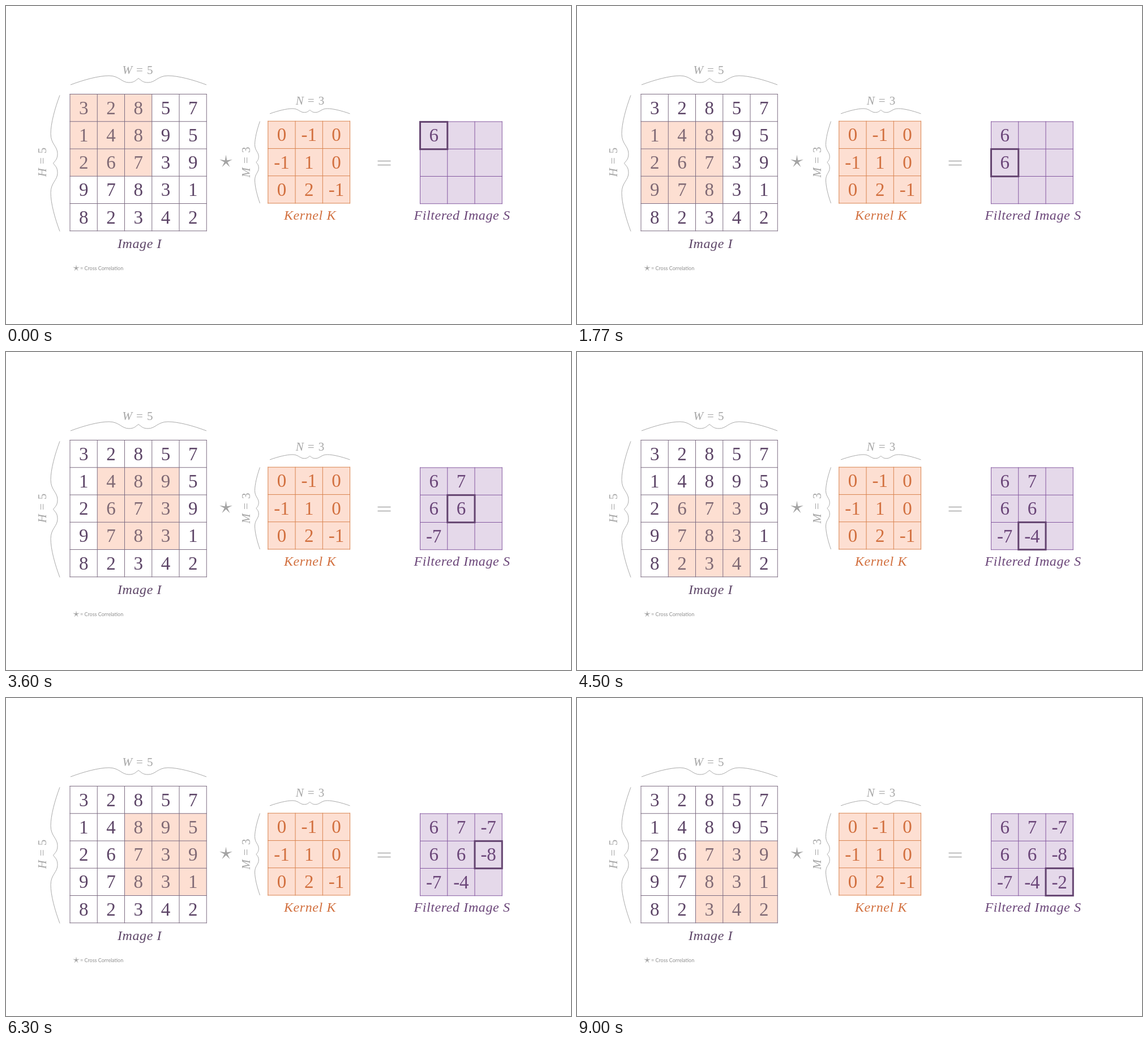
An HTML page that plays this animation: 998 px wide and 561 px high, repeating every 9.03 s.

```html
<!DOCTYPE html>
<html lang="en">
<head>
<meta charset="utf-8">
<title>Cross correlation</title>
<style>
  html, body { margin: 0; width: 100%; height: 100%; overflow: hidden; background: #fff; }
  svg { display: block; width: 100vw; height: 100vh; }
  text { font-family: "Liberation Serif", "Times New Roman", serif; text-anchor: middle; }
  .num { font-size: 33px; }
  .title { font-size: 24px; font-style: italic; letter-spacing: .6px; }
  .dim { font-size: 21px; fill: #a6a6a6; word-spacing: 1.8px; }
  .dim tspan { font-style: italic; }
  .note { font: 9px Lato, "Open Sans", sans-serif; fill: #8f8f8f; text-anchor: start; }
  .thin { fill: none; stroke: #a9a9a9; stroke-width: 1; vector-effect: non-scaling-stroke; }
</style>
</head>
<body>
<svg id="stage" viewBox="0 0 998 561"></svg>
<script>
const NS = "http://www.w3.org/2000/svg";
const stage = document.getElementById("stage");
const LOOP = 9030, STEP = 900, CELL = 48.25;

const image = ["32857", "14895", "26739", "97831", "82342"].map(r => [...r].map(Number));
const kernel = [[0, -1, 0], [-1, 1, 0], [0, 2, -1]];
const filtered = kernel.map((_, r) => kernel.map((_, c) =>
  kernel.reduce((sum, row, i) =>
    sum + row.reduce((s, k, j) => s + k * image[r + i][c + j], 0), 0)));

function add(tag, attrs, text) {
  const el = document.createElementNS(NS, tag);
  for (const key in attrs) el.setAttribute(key, attrs[key]);
  if (text !== undefined) el.textContent = text;
  stage.appendChild(el);
  return el;
}

function fillBox(x, y, n, fill) {
  return add("rect", { x, y, width: n * CELL, height: n * CELL, fill });
}

// Draws the lines and values of a matrix and returns its text elements.
function grid(x, y, values, stroke, fill) {
  const n = values.length, size = n * CELL;
  let d = "";
  for (let i = 0; i <= n; i++) {
    const o = i * CELL;
    d += `M${x + o} ${y}v${size}M${x} ${y + o}h${size}`;
  }
  add("path", { d, stroke, fill: "none", "stroke-width": 1, "stroke-linecap": "square" });
  return values.map((row, r) => row.map((v, c) => add("text", {
    class: "num", fill, x: x + (c + .5) * CELL, y: y + (r + .5) * CELL + 11
  }, v)));
}

// A brace that is 240 long and 16 deep before scaling.
function brace(x, y, length, depth, turn) {
  add("path", {
    class: "thin",
    d: "M0 0C24 -9 50 -16 68 -16C86 -16 90 -4 103 -4C113 -4 115 -8 120 -11.5" +
       "C125 -8 127 -4 137 -4C150 -4 154 -16 172 -16C190 -16 216 -9 240 0",
    transform: `translate(${x} ${y}) rotate(${turn}) scale(${length / 240} ${depth / 16})`
  });
}

function dimension(x, y, name, n, turn) {
  const t = add("text", { class: "dim", transform: `translate(${x} ${y}) rotate(${turn})` });
  const letter = document.createElementNS(NS, "tspan");
  letter.textContent = name;
  t.append(letter, ` = ${n}`);
}

function star(x, y, radius) {
  const points = Array.from({ length: 10 }, (_, i) => {
    const a = (i * 36 - 90) * Math.PI / 180, r = i % 2 ? radius * .24 : radius;
    return `${(x + r * Math.cos(a)).toFixed(2)},${(y + r * Math.sin(a)).toFixed(2)}`;
  });
  add("polygon", { points: points.join(" "), fill: "#a3a3a3" });
}

const IX = 113, IY = 155.5, RX = 731.5, RY = 204;
const patch = fillBox(IX, IY, 3, "#fddfd2");
const pixels = grid(IX, IY, image, "#7d6c82", "#5d4567");

fillBox(462.8, 203.2, 3, "#fddfd2");
grid(462.8, 203.2, kernel, "#d9834f", "#d2703f");

fillBox(RX, RY, 3, "#e5d9ea");
const results = grid(RX, RY, filtered, "#8559a0", "#6b4679");
const frame = add("rect", {
  width: CELL, height: CELL, fill: "none", stroke: "#644470", "stroke-width": 3
});

brace(114, 139, 240, 16, 0);
brace(95, 397.5, 240, 16, -90);
brace(466, 190, 141.5, 9, 0);
brace(448.5, 348, 144.5, 9, -90);
dimension(232.5, 120, "W", 5, 0);
dimension(71, 275.5, "H", 5, -90);
dimension(537, 174, "N", 3, 0);
dimension(431, 275.5, "M", 3, -90);

add("text", { class: "title", x: 236, y: 427, fill: "#5d4567" }, "Image I");
add("text", { class: "title", x: 537, y: 377, fill: "#d2703f" }, "Kernel K");
add("text", { class: "title", x: 805.5, y: 377, fill: "#6b4679" }, "Filtered Image S");

star(388.5, 274.5, 12);
add("path", { class: "thin", d: "M656.5 273.5h23M656.5 280.5h23", style: "stroke-width:1.4" });
star(124, 462.5, 6.3);
add("text", { class: "note", x: 131, y: 466 }, "= Cross Correlation");

function draw(t) {
  const pos = Math.min(8, Math.floor(t / STEP));
  const col = Math.floor(pos / 3), row = pos % 3;
  patch.setAttribute("x", IX + col * CELL);
  patch.setAttribute("y", IY + row * CELL);
  frame.setAttribute("x", RX + col * CELL);
  frame.setAttribute("y", RY + .4 + row * 48);
  pixels.forEach((line, r) => line.forEach((el, c) => {
    const inside = r >= row && r < row + 3 && c >= col && c < col + 3;
    el.setAttribute("fill", inside ? "#806a75" : "#5d4567");
  }));
  results.forEach((line, r) => line.forEach((el, c) =>
    el.setAttribute("visibility", c * 3 + r <= pos ? "visible" : "hidden")));
}

const start = performance.now();
function tick(now) {
  draw(Math.max(0, now - start) % LOOP);
  requestAnimationFrame(tick);
}
draw(0);
requestAnimationFrame(tick);
</script>
</body>
</html>
```
